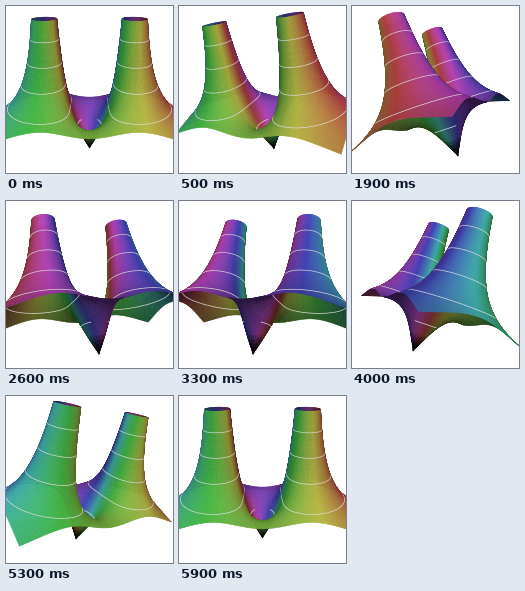
A matplotlib script that plays this animation: 167x167 px, repeating every 6000 ms.

```python
import numpy as np
import matplotlib.pyplot as plt
from matplotlib.animation import FuncAnimation
from matplotlib.collections import PolyCollection
from matplotlib.colors import hsv_to_rgb

SIZE = 167
FRAMES = 60
HALF_X, HALF_Y = 2.2, 1.15    # plotted rectangle of the complex plane
TOP = 3.45                    # height where the poles are cut
PIVOT = 1.715                 # height of the turning centre
TILT = np.radians(20.6)
EYE_DIST = 7.5
EYE_LEVEL = 0.215             # eye height above the pivot
HORIZON = 92.5                # eye level on the stage, from below
SCALE = 40.0
LEVELS = 0.7 + 0.57 * np.arange(5)
LIGHT = np.array([0.0, 0.42, 0.907])


def f(z):
    return 1 / (z - 1) + 1 / (z + 1)


def lift(z):
    return np.stack([z.real, z.imag, np.abs(f(z))], axis=-1)


def rays():
    """Angles around the pole at 1 with the inner and outer radius of each."""
    corners = np.angle([HALF_X - 1 + 1j * HALF_Y, -1 + 1j * HALF_Y])
    ang = np.unique(np.concatenate([np.linspace(-np.pi, np.pi, 121), corners, -corners]))
    c, s = np.cos(ang), np.sin(ang)
    reach_x = np.where(c > 0, HALF_X - 1, 1) / np.maximum(np.abs(c), 1e-9)
    outer = np.minimum(reach_x, HALF_Y / np.maximum(np.abs(s), 1e-9))
    lo, hi = np.full(ang.size, 0.1), np.full(ang.size, 0.6)
    for _ in range(40):
        mid = (lo + hi) / 2
        above = np.abs(f(1 + mid * np.exp(1j * ang))) > TOP
        lo, hi = np.where(above, mid, lo), np.where(above, hi, mid)
    return ang, lo, outer


def contour(z, level):
    """Short segments where the height passes the level, ray by ray."""
    h = np.abs(f(z))
    cross = (h[:, :-1] >= level) & (h[:, 1:] < level)
    found = cross.any(axis=1)
    k = cross.argmax(axis=1)
    i = np.arange(len(z))
    h0, h1 = h[i, k], h[i, k + 1]
    t = np.where(found, (h0 - level) / np.where(found, h0 - h1, 1), 0)
    p = lift(np.where(found, z[i, k] + t * (z[i, k + 1] - z[i, k]), 0.3))
    p[:, 2] = level
    ok = found[:-1] & found[1:]
    a, b = p[:-1][ok], p[1:][ok]
    return np.stack([a, b, b, a], axis=1)


ang, inner, outer = rays()
t = np.linspace(0, 1, 28)
r = inner[:, None] * (outer / inner)[:, None] ** t
right = 1 + r * np.exp(1j * ang)[:, None]

quads, hues, heights, lines = [], [], [], []
for z in (right, -right.conj()):
    cell = np.stack([z[:-1, :-1], z[1:, :-1], z[1:, 1:], z[:-1, 1:]], axis=-1).reshape(-1, 4)
    mean = f(cell.mean(axis=1))
    quads.append(lift(cell))
    hues.append(np.angle(mean) / (2 * np.pi) % 1)
    heights.append(np.abs(mean))
    lines += [contour(z, level) for level in LEVELS]

quads = np.concatenate(quads)
lines = np.concatenate(lines)
hues = np.concatenate(hues)
heights = np.concatenate(heights)
solid = np.concatenate([quads, lines]) - np.array([0, 0, PIVOT])
nq, nl = len(quads), len(lines)

normals = np.cross(quads[:, 2] - quads[:, 0], quads[:, 3] - quads[:, 1])
normals *= np.where(normals[:, 2:] < 0, -1, 1)
normals /= np.linalg.norm(normals, axis=1, keepdims=True) + 1e-12
fade = np.clip(heights / 0.45, 0, 1) ** 1.5
eye = np.array([0, EYE_LEVEL, EYE_DIST])


def turn(v, phi):
    """Tilt towards the viewer, then spin about the screen's vertical."""
    x, y, z = v[..., 0], v[..., 1], v[..., 2]
    near = -y * np.cos(TILT) + z * np.sin(TILT)
    up = z * np.cos(TILT) + y * np.sin(TILT)
    return np.stack([x * np.cos(phi) - near * np.sin(phi), up,
                     x * np.sin(phi) + near * np.cos(phi)], axis=-1)


def project(p):
    grow = SCALE * EYE_DIST / (EYE_DIST - p[..., 2:])
    return (p[..., :2] - eye[:2]) * grow + np.array([SIZE / 2, HORIZON])


def shade(centre, phi):
    n = turn(normals, phi)
    back = ((eye - centre) * n).sum(axis=1) < 0
    n = np.where(back[:, None], -n, n)
    value = 0.36 + 0.36 * np.clip(n @ LIGHT, 0, 1)
    value *= np.where(back, 0.68, 1) * fade
    return hsv_to_rgb(np.stack([hues, np.full(nq, 0.64), value], axis=1))


fig = plt.figure(figsize=(SIZE / 100, SIZE / 100), dpi=100, facecolor="white")
ax = fig.add_axes([0, 0, 1, 1])
ax.set_xlim(0, SIZE)
ax.set_ylim(0, SIZE)
ax.axis("off")
surface = PolyCollection(np.zeros((1, 4, 2)))
ax.add_collection(surface, autolim=False)

widths = np.concatenate([np.full(nq, 0.35), np.full(nl, 0.5)])
white = np.tile([0.88, 0.88, 0.88], (nl, 1))


def draw(i):
    phi = 2 * np.pi * i / (FRAMES - 1)
    p = turn(solid, phi)
    centre = p.mean(axis=1)
    dist = np.linalg.norm(centre - eye, axis=1)
    dist[nq:] -= 0.1
    order = np.argsort(-dist)
    colors = np.concatenate([shade(centre[:nq], phi), white])[order]
    surface.set_verts(project(p)[order])
    surface.set_facecolor(colors)
    surface.set_edgecolor(colors)
    surface.set_linewidth(widths[order])
    return [surface]


anim = FuncAnimation(fig, draw, frames=FRAMES, interval=100, repeat=True, repeat_delay=0)
plt.show()
```
